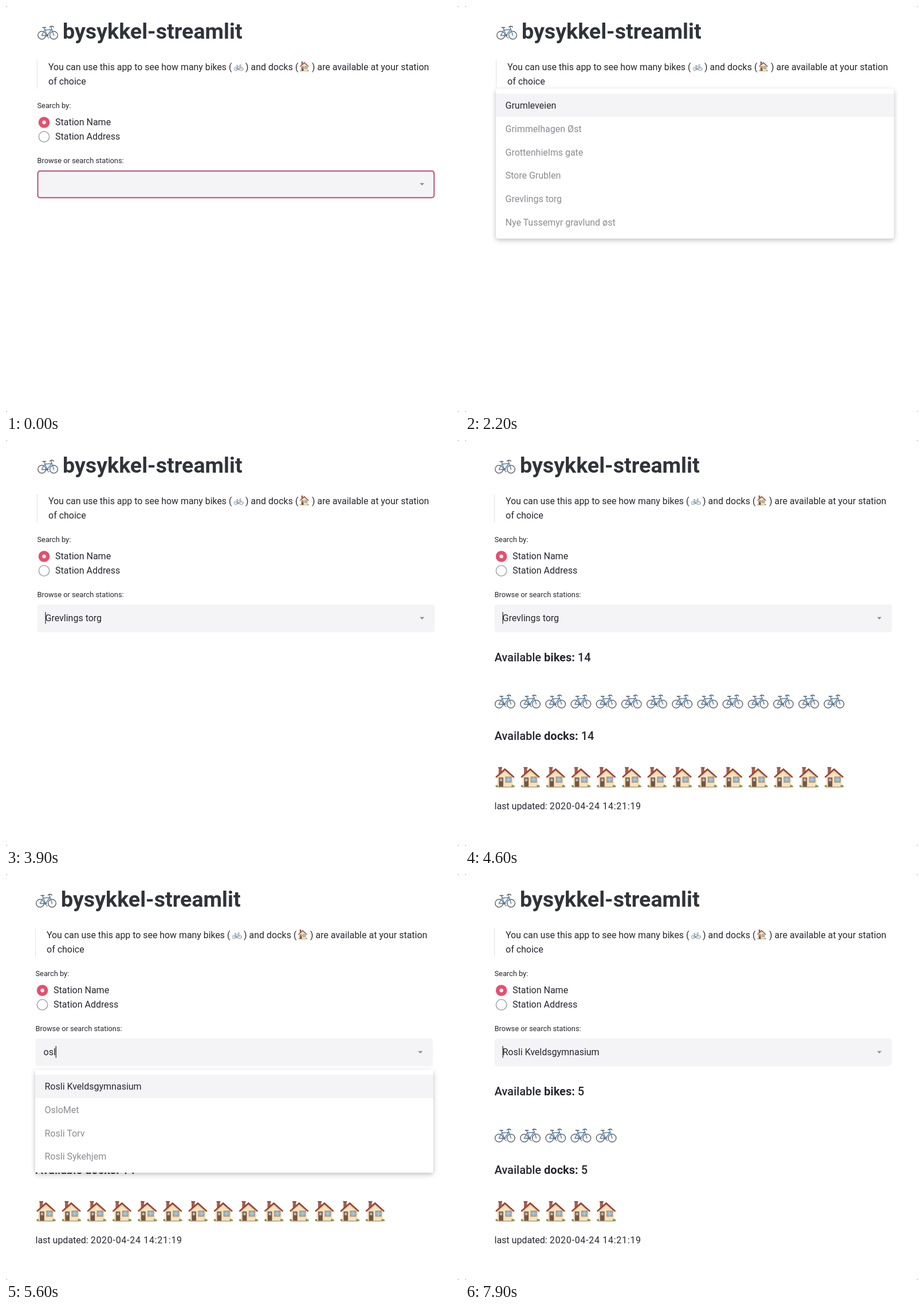
An HTML page that plays this animation: 791x708 px, repeating every 8 s.

```html
<!DOCTYPE html>
<html lang="en">
<head>
<meta charset="utf-8">
<title>bysykkel-streamlit</title>
<style>
  html, body { margin: 0; width: 100%; height: 100%; overflow: hidden; background: #b9b9bb; }
  svg { display: block; width: 100vw; height: 100vh; }
  text { font: 16px Roboto, "Open Sans", sans-serif; fill: #262730; white-space: pre; }
  .title { font-size: 37.6px; font-weight: 700; fill: #31333b; }
  .label { font-size: 12.8px; }
  .head { font-size: 20px; font-weight: 500; }
  .bold { font-weight: 700; }
  .date { letter-spacing: .72px; }
  .dim { fill: #8b8c92; }
</style>
</head>
<body>
<svg viewBox="0 0 791 708">
  <defs>
    <filter id="shadow" x="-5%" y="-15%" width="110%" height="135%">
      <feDropShadow dx="0" dy="3" stdDeviation="4" flood-color="#000" flood-opacity=".26"/>
    </filter>
    <symbol id="bike" viewBox="0 0 36 25" overflow="visible">
      <g fill="none" stroke-linecap="round" stroke-linejoin="round">
        <path d="M2 17H14M8 11V23M4 13l8 8M12 13L4 21M22 17H34M28 11V23M24 13l8 8M32 13L24 21" stroke="#d5d8dc" stroke-width=".5"/>
        <g stroke="#505257" stroke-width="1.3">
          <circle cx="7.600" cy="17" r="6.900"/><circle cx="28.400" cy="17" r="6.900"/>
        </g>
        <path d="M7.600 17L12.500 8 24.500 7 17 17.500H7.600M17 17.500L11.800 4.500M28.400 17L23.800 3" stroke="#5580a8" stroke-width="1.4"/>
        <path d="M9 3.500h5.500M21.500 2.800l2.300-1.600 3.500.4.800 1.400" stroke="#505157" stroke-width="1.400"/>
        <circle cx="17" cy="17.500" r="1.700" stroke="#6b6e75"/>
        <path d="M17 17.500l1.800 4h1.800" stroke="#65676d"/>
      </g>
    </symbol>
    <symbol id="house" viewBox="0 0 36 36" overflow="visible">
      <path d="M7 1h5.500v11H7z" fill="#a5614f"/>
      <path d="M6.300 0h6.900v1.800H6.300z" fill="#75463e"/>
      <path d="M4.500 17L18 4.500 31.500 17V34.500h-27z" fill="#f6e2bd"/>
      <path d="M4.500 17.500L18 5.500l13.500 12v1.700L18 7.400 4.500 19.200z" fill="#d9bd94"/>
      <path d="M1.300 16.800L18 1.800l16.700 15-1.400 1.600L18 4.900 2.700 18.400z" fill="#a9473a"/>
      <path d="M2 17.700L18 3.700l16 14-.7.800L18 5.200 2.700 18.500z" fill="#7c3a30"/>
      <path d="M7.300 18h7.700v16.500H7.300z" fill="#7b5440"/>
      <path d="M9 20h4.300v4.600H9z" fill="#a9bac4"/>
      <path d="M18.500 16.500h11V27h-11z" fill="#ad8c68"/>
      <path d="M19.600 17.600h8.800v8.200h-8.800z" fill="#8fb3cd"/>
      <path d="M24 17.600v8.200M19.600 21.700h8.800" stroke="#c9d9e2" stroke-width=".7"/>
      <path d="M4 34h28v1.500H4z" fill="#b5a082"/>
      <g fill="#84994f">
        <circle cx="3.500" cy="33" r="2"/><circle cx="31.300" cy="32.800" r="2.100"/><circle cx="33.600" cy="33.600" r="1.500"/>
      </g>
    </symbol>
  </defs>

  <rect width="791" height="708" rx="4" fill="#fff"/>
  <g id="page">
    <use href="#bike" x="55" y="34" width="36" height="25"/>
    <text class="title" x="99" y="57">bysykkel-streamlit</text>

    <path d="M54.5 95V144" stroke="#e0e1e6"/>
    <text x="74" y="112" style="font-size:15.9px">You can use this app to see how many bikes (</text>
    <use href="#bike" x="398" y="102" width="16.5" height="11.5"/>
    <text x="418" y="112">) and docks (</text>
    <use href="#house" x="512.5" y="97" width="17" height="17"/>
    <text x="534" y="112">) are available at your station</text>
    <text x="74" y="137">of choice</text>

    <text class="label" x="54.5" y="178">Search by:</text>
    <circle cx="66.5" cy="203" r="9.8" fill="#e4506f"/>
    <circle cx="66.5" cy="203" r="3.2" fill="#fff"/>
    <circle cx="66.5" cy="228" r="9.2" fill="#fff" stroke="#a4a5ac" stroke-width="1.6"/>
    <text x="86" y="208">Station Name</text>
    <text x="86" y="233">Station Address</text>

    <text class="label" x="54.5" y="273.5">Browse or search stations:</text>
    <rect id="field" x="55.5" y="287.7" width="692" height="46.6" rx="4" fill="#f4f4f6" stroke-width="2"/>
    <path d="M722.5 308.7h8l-4 4.200z" fill="#8f9097"/>
    <text id="value" x="68.5" y="316"></text>
    <rect id="caret" y="300" width="1.2" height="20.5" fill="#222"/>

    <g id="results">
      <text class="head" x="54.5" y="386">Available <tspan class="bold">bikes:</tspan> <tspan class="count"></tspan></text>
      <g id="bikes"></g>
      <text class="head" x="54.5" y="523">Available <tspan class="bold">docks:</tspan> <tspan class="count"></tspan></text>
      <g id="docks"></g>
      <text x="54.5" y="643.5">last updated: <tspan class="date">2020-04-24 14:21:19</tspan></text>
    </g>

    <g id="menu">
      <rect id="panel" x="54" width="695" rx="4" fill="#fff" filter="url(#shadow)"/>
      <rect x="54" y="8.5" width="695" height="40.5" fill="#f4f4f6"/>
      <g id="options"></g>
    </g>
  </g>
  <path id="mouse" d="M0 0V14.5L3.4 11.5 5.7 16.8 8.3 15.7 6 10.5H10.6Z" fill="#111" stroke="#fff" stroke-width="1.2" stroke-linejoin="round"/>
</svg>

<script>
const LOOP = 8000, ROW = 40.8, PITCH = 44.2;
const STATIONS = [
  'Grumleveien', 'Grimmelhagen Øst', 'Grottenhielms gate', 'Store Grublen',
  'Grevlings torg', 'Nye Tussemyr gravlund øst', 'Rosli Kveldsgymnasium', 'OsloMet',
  'Rosli Torv', 'Rosli Sykehjem', 'Bjelkesvingen', 'Fiskerlia Nedre', 'Tårnvika'
];
const PICK1 = STATIONS[4], PICK2 = STATIONS[6];

// Each step overrides part of the state; top is the menu position (0 = closed).
const STEPS = [
  { at: 0, text: '', picked: false, focus: true, top: 0, count: 0, blink: -700 },
  { at: 1600, top: 144.5, blink: 1600 },
  { at: 1800, text: 'g', blink: 1800 },
  { at: 2100, text: 'gr', blink: 2100 },
  { at: 2500, top: 341.5 },
  { at: 2600, text: 'grev', blink: 2600 },
  { at: 3500, text: PICK1, picked: true, focus: false, top: 0, blink: 3500 },
  { at: 4200, count: 14 },
  { at: 5000, text: 'o', picked: false, top: 341.5, blink: 5000 },
  { at: 5300, text: 'os', blink: 5300 },
  { at: 5500, text: 'osl', blink: 5500 },
  { at: 6600, text: PICK2, picked: true, top: 0, blink: 6600 },
  { at: 6700, count: 5 }
];

const $ = id => document.getElementById(id);
const show = (el, on) => el.setAttribute('visibility', on ? 'visible' : 'hidden');

function add(parent, tag, attrs, text = '') {
  const el = document.createElementNS(parent.namespaceURI, tag);
  for (const key in attrs) el.setAttribute(key, attrs[key]);
  el.textContent = text;
  return parent.appendChild(el);
}

function iconRow(parent, href, y, height) {
  for (let i = 0; i < 14; i++)
    add(parent, 'use', { href, x: 54.8 + i * PITCH, y, width: 36, height });
}
iconRow($('bikes'), '#bike', 443.5, 25);
iconRow($('docks'), '#house', 570.5, 36);

let last = null;

function applyState(s, key) {
  if (key === last) return;
  last = key;
  $('page').setAttribute('transform', `translate(${s.count ? -3 : 0} 0)`);
  $('value').textContent = s.text;
  $('field').setAttribute('stroke', s.focus ? '#b94d74' : '#f4f4f6');
  const width = s.picked || !s.text ? 0 : $('value').getComputedTextLength();
  $('caret').setAttribute('x', 68.4 + width);

  $('results').style.display = s.count ? '' : 'none';
  document.querySelectorAll('.count').forEach(el => el.textContent = s.count);
  for (const id of ['bikes', 'docks'])
    [...$(id).children].forEach((el, i) => el.style.display = i < s.count ? '' : 'none');

  $('menu').style.display = s.top ? '' : 'none';
  $('menu').setAttribute('transform', `translate(0 ${s.top})`);
  const hits = STATIONS.filter(name => name.toLowerCase().includes(s.text));
  $('panel').setAttribute('height', 16 + hits.length * ROW);
  $('options').replaceChildren();
  hits.forEach((name, i) =>
    add($('options'), 'text', { x: 70.5, y: 34.4 + i * ROW, class: i ? 'dim' : '' }, name));
}

function render(t) {
  const past = STEPS.filter(step => step.at <= t);
  const s = Object.assign({}, ...past);
  applyState(s, past.length);
  show($('caret'), (t - s.blink) % 1000 < 500);

  const p = Math.min(1, Math.max(0, (t - 100) / 900));
  const left = (1 - p) ** 2 * (1 + 2 * p);
  $('mouse').setAttribute('transform', `translate(${77.5 + 170 * left} ${325.5 + 210 * left})`);
  show($('mouse'), t >= 100 && t < 1600);
}

const start = performance.now();
function tick() {
  render((performance.now() - start) % LOOP);
  requestAnimationFrame(tick);
}
tick();
</script>
</body>
</html>
```
